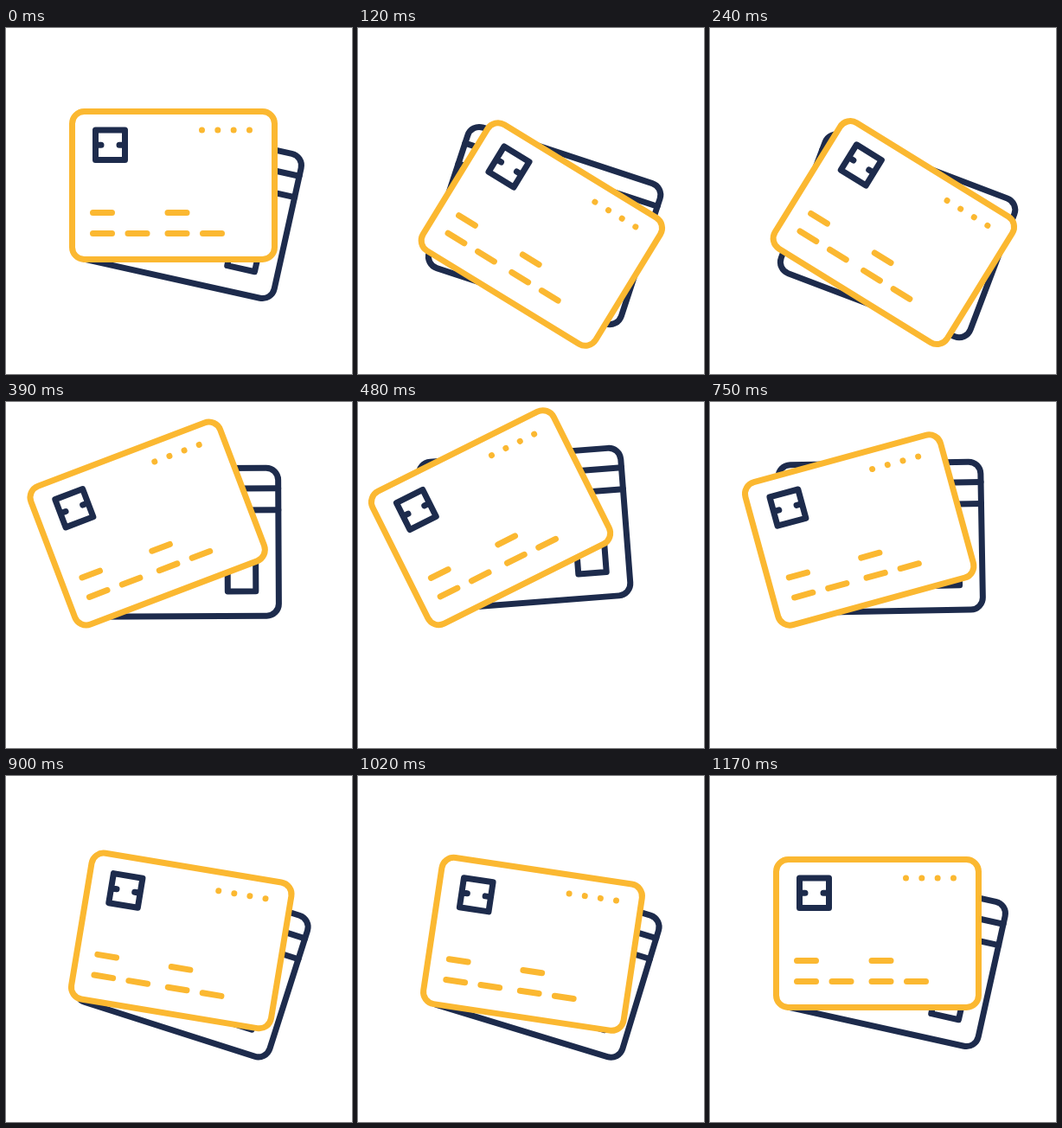
An HTML page that plays this animation: 400 by 400 pixels, repeating every 1200 ms.

```html
<!DOCTYPE html>
<html lang="en">
<head>
<meta charset="utf-8">
<title>Swinging cards</title>
<style>
  html, body { margin: 0; width: 100%; height: 100%; overflow: hidden; background: #fff; }
  svg { display: block; width: 100vw; height: 100vh; }
  g { fill: none; stroke-width: 7; stroke-linecap: round; stroke-linejoin: round; }
  .navy { stroke: #1d2b4c; }
  .gold { stroke: #fbb831; }
  .face { fill: #fff; }
</style>
</head>
<body>
<svg viewBox="0 0 400 400">
  <g id="back" class="navy">
    <rect class="face" x="-14" y="-157" width="234" height="171" rx="14"/>
    <path d="M-14-133.5H220M-14-108.5H220M161-48H193.5V-14.5H161Z"/>
  </g>
  <g id="front" class="gold">
    <rect class="face" x="76.5" y="96.5" width="234" height="171" rx="14"/>
    <path d="M100.5 213.5h22M187 213.5h22M100.5 237.5h22M141 237.5h22M187 237.5h22M227.5 237.5h22"/>
    <path d="M226.5 118h55" stroke-dasharray="0 18.33"/>
    <path class="navy" d="M103.5 118H137.5V152.5H103.5ZM103.5 135.3h6.5M137.5 135.3h-6.5"/>
  </g>
</svg>
<script>
const LOOP = 1200, STEP = 30;

// Key poses: time, front angle, back angle, back height
const poses = [
  [0, 0, 12.5, 254],
  [165, 38.5, 20, 268],
  [240, 31.7, 20.8, 270.6],
  [390, -20.8, -0.3, 234.3],
  [565, -28.6, -6, 222.2],
  [750, -15.3, -1, 229.7],
  [900, 9.4, 17.7, 248.2],
  [950, 11.2, 18.3, 249.5],
  [1170, 0, 12.5, 254],
];

const smooth = x => {
  const u = Math.min(1, Math.max(0, x));
  return u * u * (3 - 2 * u);
};

// Slope of one column at a key, flat at every turning point
function tangent(i, col) {
  if (i === 0 || i === poses.length - 1) return 0;
  const slope = k => (poses[k + 1][col] - poses[k][col]) / (poses[k + 1][0] - poses[k][0]);
  const a = slope(i - 1), b = slope(i);
  return a * b > 0 ? 2 * a * b / (a + b) : 0;
}

// Smooth curve through the key poses
function poseAt(t) {
  const end = Math.max(1, poses.findIndex(p => p[0] >= t)), start = end - 1;
  const from = poses[start], to = poses[end];
  const span = to[0] - from[0], u = (t - from[0]) / span, w = 1 - u;
  return [1, 2, 3].map(col =>
    from[col] + (to[col] - from[col]) * smooth(u)
    + span * u * w * (w * tangent(start, col) - u * tangent(end, col)));
}

const back = document.getElementById('back');
const front = document.getElementById('front');

function draw() {
  const t = Math.floor(performance.now() % LOOP / STEP) * STEP;
  const [frontAngle, backAngle, backY] = poseAt(t);
  const lift = -9.2 * smooth(t / 180) * smooth((1110 - t) / 210);
  back.setAttribute('transform', `translate(95.4 ${backY}) rotate(${backAngle})`);
  front.setAttribute('transform', `translate(0 ${lift}) rotate(${frontAngle} 90.6 247.1)`);
  requestAnimationFrame(draw);
}
draw();
</script>
</body>
</html>
```
